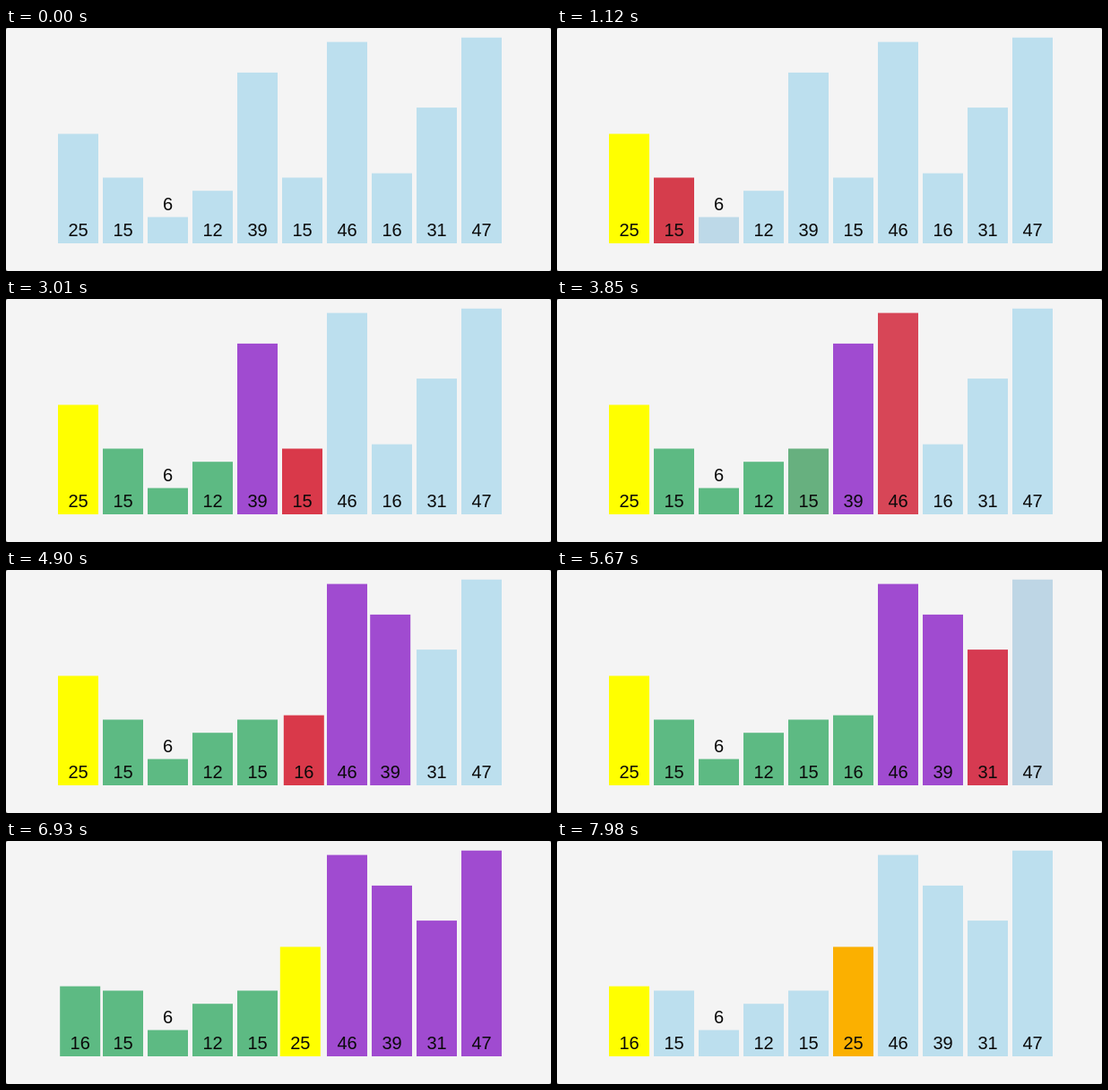
These frames come from a looping animation (608x272 px, 8000 ms). An HTML page:

```html
<!DOCTYPE html>
<html lang="en">
<head>
<meta charset="utf-8">
<title>Quick sort partition</title>
<style>
  html, body { margin: 0; width: 100%; height: 100%; overflow: hidden; background: #555; }
  svg { display: block; width: 608px; height: 272px; background: #f4f4f4; border-radius: 2px; }
  text { font: 20px "Liberation Sans", Arial, sans-serif; text-anchor: middle; fill: #0a0a0a; }
</style>
</head>
<body>
<svg id="stage" viewBox="0 0 608 272"></svg>
<script>
const LOOP = 8000, TICK = 70;
const START = 30, STEP = 504, MOVE = 400;
const LEFT = 58, PITCH = 50, WIDTH = 45, BASE = 241, UNIT = 4.9;

const values = [25, 15, 6, 12, 39, 15, 46, 16, 31, 47];
const colors = {
  blue: [188, 223, 238],
  yellow: [255, 255, 0],
  red: [217, 57, 74],
  green: [93, 186, 131],
  purple: [160, 75, 208],
  orange: [251, 176, 0]
};

// Each step recolours bars (by their first position), swaps two, or clears all.
const steps = [
  { yellow: 0 },
  { red: 1 },
  { green: 1, red: 2 },
  { green: 2, red: 3 },
  { green: 3, red: 4 },
  { purple: 4, red: 5 },
  { swap: [4, 5] },
  { green: 5, red: 6 },
  { purple: 6, red: 7 },
  { swap: [4, 7] },
  { green: 7, red: 8 },
  { purple: 8, red: 9 },
  { purple: 9 },
  { swap: [0, 7] },
  { clear: true, orange: 0 },
  { yellow: 7 }
];

function applyStep(state, { swap, clear, ...paint }) {
  const next = state.map(bar => ({ ...bar, color: clear ? colors.blue : bar.color }));
  if (swap) {
    const [a, b] = swap;
    next[a].slot = state[b].slot;
    next[b].slot = state[a].slot;
  }
  for (const name in paint) next[paint[name]].color = colors[name];
  return next;
}

const states = [values.map((_, slot) => ({ slot, color: colors.blue }))];
for (const step of steps) states.push(applyStep(states[states.length - 1], step));

function add(parent, tag, attrs) {
  const node = document.createElementNS("http://www.w3.org/2000/svg", tag);
  for (const key in attrs) node.setAttribute(key, attrs[key]);
  return parent.appendChild(node);
}

const stage = document.getElementById("stage");
const bars = values.map(value => {
  const height = value * UNIT;
  const group = add(stage, "g", {});
  const rect = add(group, "rect", { y: BASE - height, width: WIDTH, height });
  const labelY = height < 40 ? BASE - height - 8 : BASE - 8;
  add(group, "text", { x: WIDTH / 2, y: labelY }).textContent = value;
  return { group, rect };
});

const mix = (a, b, k) => a + (b - a) * k;
const ease = p => p < 0.5 ? 4 * p ** 3 : 1 - 4 * (1 - p) ** 3;

function draw(time) {
  const index = Math.min(steps.length - 1, Math.max(0, Math.floor((time - START) / STEP)));
  const progress = (time - START - index * STEP) / MOVE;
  const k = ease(Math.min(1, Math.max(0, progress)));
  bars.forEach(({ group, rect }, i) => {
    const from = states[index][i], to = states[index + 1][i];
    const x = LEFT + PITCH * mix(from.slot, to.slot, k);
    const rgb = from.color.map((c, j) => Math.round(mix(c, to.color[j], k)));
    group.setAttribute("transform", `translate(${x} 0)`);
    rect.setAttribute("fill", `rgb(${rgb})`);
  });
}

const origin = performance.now();
function loop() {
  const time = (performance.now() - origin) % LOOP;
  draw(Math.floor(time / TICK) * TICK);
  requestAnimationFrame(loop);
}
loop();
</script>
</body>
</html>
```
